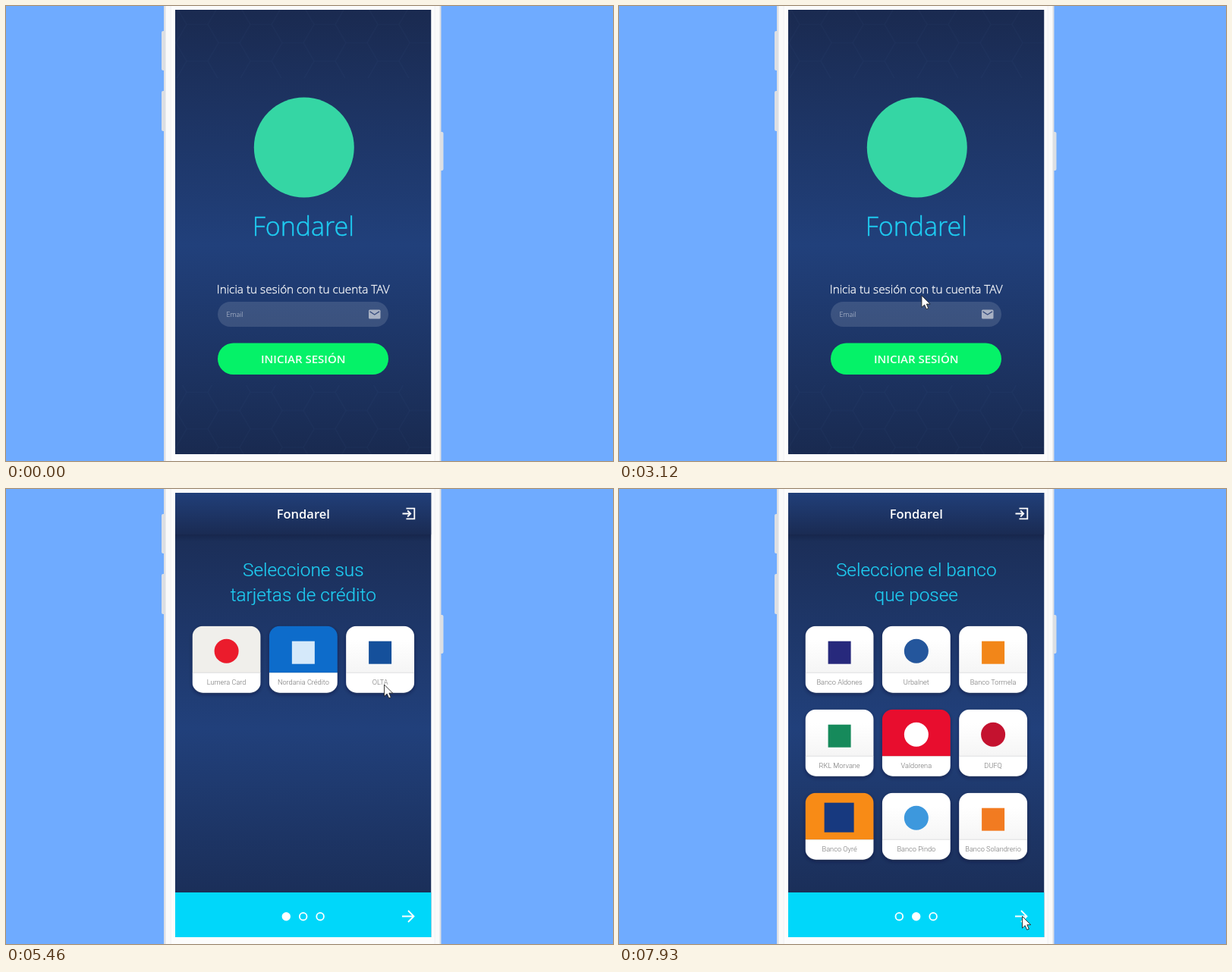
Animation of 800 by 600 pixels, one loop 8000 ms. Source, as an HTML page:

```html
<!DOCTYPE html>
<html lang="es">
<head>
<meta charset="utf-8">
<title>Fondarel</title>
<style>
  html, body { margin: 0; width: 100%; height: 100%; overflow: hidden; background: #6fabff; }
  svg { display: block; width: 100vw; height: 100vh; }
  text { text-anchor: middle; fill: #fff; font-family: "Open Sans", sans-serif; }
  .brand { font-size: 34px; font-weight: 300; fill: #1fcdf2; stroke: #1fcdf2; stroke-width: .4; }
  .bar { font-size: 16.5px; font-weight: 600; }
  .intro { font-size: 15.3px; font-weight: 300; stroke: #fff; stroke-width: .3; }
  .hint { font-size: 9px; font-weight: 300; text-anchor: start; fill: #d0d6e2; }
  .button { font-size: 15px; font-weight: 600; fill: #f2fff6; }
  .title { font: 300 24.4px Roboto, sans-serif; fill: #1fcdf2; stroke: #1fcdf2; stroke-width: .2; }
  .label { font: 300 9.2px Roboto, sans-serif; fill: #707070; }
  .chosen .label { font-weight: 500; fill: #fff; }
  .chosen .foot { fill: #05c877; }
  .icon { fill: none; stroke: #fff; stroke-width: 1.8; }
</style>
</head>
<body>
<svg viewBox="0 0 800 600">
  <defs>
    <linearGradient id="night" x2="0" y2="1">
      <stop offset="0" stop-color="#1a2a50"/>
      <stop offset=".53" stop-color="#21407b"/>
      <stop offset="1" stop-color="#192a50"/>
    </linearGradient>
    <linearGradient id="head" x2="0" y2="1">
      <stop offset="0" stop-color="#213f79"/>
      <stop offset="1" stop-color="#1a2b53"/>
    </linearGradient>
    <linearGradient id="dusk" x2="0" y2="1">
      <stop offset="0" stop-color="#101b3a" stop-opacity=".4"/>
      <stop offset="1" stop-color="#101b3a" stop-opacity="0"/>
    </linearGradient>
    <linearGradient id="paper" x2="0" y2="1">
      <stop offset=".3" stop-color="#fff"/>
      <stop offset="1" stop-color="#f5f5f5"/>
    </linearGradient>
    <pattern id="hexes" width="84" height="48.5" patternUnits="userSpaceOnUse">
      <path d="M0 24.25H14L28 0H56L70 24.25H84M70 24.25L56 48.5H28L14 24.25" fill="none" stroke="#5d8fd0" stroke-opacity=".045"/>
    </pattern>
    <filter id="shadow" x="-20%" y="-20%" width="140%" height="150%">
      <feDropShadow dx="0" dy="2" stdDeviation="2.5" flood-color="#0a1430" flood-opacity=".5"/>
    </filter>
    <clipPath id="screen"><rect x="223" y="5" width="337.5" height="586"/></clipPath>
    <clipPath id="round"><rect width="90" height="88" rx="14"/></clipPath>
  </defs>

  <rect width="800" height="600" fill="#6fabff"/>
  <g fill="#dcdfe4">
    <rect x="205" y="33" width="8" height="52" rx="2"/>
    <rect x="205" y="112" width="8" height="53" rx="2"/>
    <rect x="569" y="166" width="7.5" height="51" rx="2"/>
    <rect x="208" width="365.5" height="600"/>
  </g>
  <rect x="210.5" width="361" height="600" fill="#fafafa"/>
  <rect x="216.5" width="349.5" height="600" fill="#f4f4f6"/>
  <rect x="218" width="346.5" height="600" fill="#fcfcfc"/>

  <g clip-path="url(#screen)">
    <g id="login"></g>
    <g id="cards"></g>
    <g id="banks"></g>
  </g>
  <path id="cursor" d="M0 0V15.5L3.7 12.2L6.2 17.8L8.8 16.7L6.4 11.2H11.2Z" fill="#fff" stroke="#222" stroke-width=".9"/>
</svg>
<script>
const $ = id => document.getElementById(id);
const MID = 391.75, WIDTH = 337.5, LOOP = 8000, STEP = 130;

const text = (cls, x, y, s) => `<text class="${cls}" x="${x}" y="${y}">${s}</text>`;
const rect = (x, y, w, h, fill, more = '') =>
  `<rect x="${x}" y="${y}" width="${w}" height="${h}" fill="${fill}" ${more}/>`;
const square = color => rect(30, 20, 30, 30, color);
const circle = color => `<circle cx="45" cy="33" r="16" fill="${color}"/>`;

const backdrop = rect(223, 5, WIDTH, 586, 'url(#night)');

function card([name, mark, top = 'url(#paper)'], i) {
  const x = 245.6 + i % 3 * 101.25, y = 180.7 + Math.floor(i / 3) * 110;
  return `<g class="card" transform="translate(${x} ${y})">
    <g filter="url(#shadow)"><g clip-path="url(#round)">
      ${rect(0, 0, 90, 62, top)}
      ${rect(0, 61.5, 90, 27, '#fff', 'class="foot"')}
      ${rect(0, 61, 90, 1, '#000', 'fill-opacity=".08"')}
    </g></g>
    ${mark}${text('label', 45, 76.9, name)}
  </g>`;
}

function page(titles, active, list) {
  const dots = [0, 1, 2].map(i =>
    `<circle class="icon" cx="${369.3 + i * 22.4}" cy="563.7" r="4.8" style="fill:${i === active ? '#fff' : 'none'}"/>`);
  return backdrop
    + rect(223, 60, WIDTH, 9, 'url(#dusk)')
    + rect(223, 5, WIDTH, 55, 'url(#head)')
    + text('bar', MID, 39, 'Fondarel')
    + '<path class="icon" d="M522.5 32.5H533M529.2 28.5L533.2 32.5L529.2 36.5M527.5 25.7H538.3V39.3H527.5"/>'
    + titles.map((s, i) => text('title', MID, 115 + i * 33, s)).join('')
    + list.map(card).join('')
    + rect(223, 532, WIDTH, 59, '#00d7fa')
    + dots.join('')
    + '<path class="icon" d="M522 563.5H537M530 556L537.5 563.5L530 571"/>';
}

$('login').innerHTML = backdrop
  + rect(223, 5, WIDTH, 90, 'url(#hexes)')
  + rect(223, 500, WIDTH, 91, 'url(#hexes)')
  + '<circle cx="392.8" cy="186.5" r="66" fill="#35d6a4"/>'
  + text('brand', MID, 303, 'Fondarel')
  + text('intro', MID, 378.7, 'Inicia tu sesión con tu cuenta TAV')
  + rect(279, 390, 225, 33, '#fff', 'rx="16.5" fill-opacity=".13"')
  + text('hint', 290.5, 409.7, 'Email')
  + rect(478, 400.5, 15.5, 12, '#a9b2c4', 'rx="1.5"')
  + '<path d="M479.5 402.8L485.7 407L492 402.8" fill="none" stroke="#3b5080" stroke-width="1.4"/>'
  + rect(279, 444.5, 225, 41.5, '#05f268', 'rx="20.7"')
  + text('button', MID, 471, 'INICIAR SESIÓN');

$('cards').innerHTML = page(['Seleccione sus', 'tarjetas de crédito'], 0, [
  ['Lumera Card', circle('#eb1c2c'), '#f0efeb'],
  ['Nordania Crédito', square('#d5e9fa'), '#0a6ccb'],
  ['OLTA', square('#15509b')],
]);

$('banks').innerHTML = page(['Seleccione el banco', 'que posee'], 1, [
  ['Banco Aldones', square('#27297c')],
  ['Urbalnet', circle('#24569c')],
  ['Banco Tormela', square('#f28619')],
  ['RKL Morvane', square('#168a5b')],
  ['Valdorena', circle('#fff'), '#e8112d'],
  ['DUFQ', circle('#c4122f')],
  ['Banco Oyré', rect(25, 13, 39, 39, '#17397f'), '#f88b14'],
  ['Banco Pindo', circle('#3d98dd')],
  ['Banco Solandrerio', square('#f27b21')],
]);

const picked = document.querySelectorAll('#cards .card')[2];

// time, x, y of the pointer tip
const path = [
  [1820, 262, -24], [2080, 275.5, 18.5], [3510, 426.5, 463], [4550, 426.5, 463], [5330, 498.5, 258],
  [5850, 498.5, 258], [6240, 534, 305], [6500, 534, 305], [7150, 531.5, 563.5],
];

const clamp = u => Math.min(1, Math.max(0, u));
const smooth = u => u * u * (3 - 2 * u);
const cubic = u => u < .5 ? 4 * u ** 3 : 1 - 4 * (1 - u) ** 3;
const slide = (t, start) => cubic(clamp((t - start) / 340));
const shift = (id, x) => $(id).setAttribute('transform', `translate(${x} 0)`);

function pointer(t) {
  const i = path.findIndex(p => p[0] > t);
  if (i === 0) return path[0].slice(1);
  if (i < 0) return path[path.length - 1].slice(1);
  const [t0, ...a] = path[i - 1], [t1, ...b] = path[i];
  const u = smooth((t - t0) / (t1 - t0));
  return a.map((v, k) => v + (b[k] - v) * u);
}

function draw(now) {
  const t = Math.floor(now % LOOP / STEP) * STEP;
  const first = slide(t, 3851), second = slide(t, 7530);
  // the page underneath drifts away at a third of the speed
  shift('login', -.3 * WIDTH * first);
  shift('cards', WIDTH * (1 - first) - .3 * WIDTH * second);
  shift('banks', WIDTH * (1 - second));
  picked.classList.toggle('chosen', t >= 5720);
  $('cursor').setAttribute('transform', `translate(${pointer(t)})`);
}

const begin = performance.now();
(function tick() {
  draw(performance.now() - begin);
  requestAnimationFrame(tick);
})();
</script>
</body>
</html>
```
